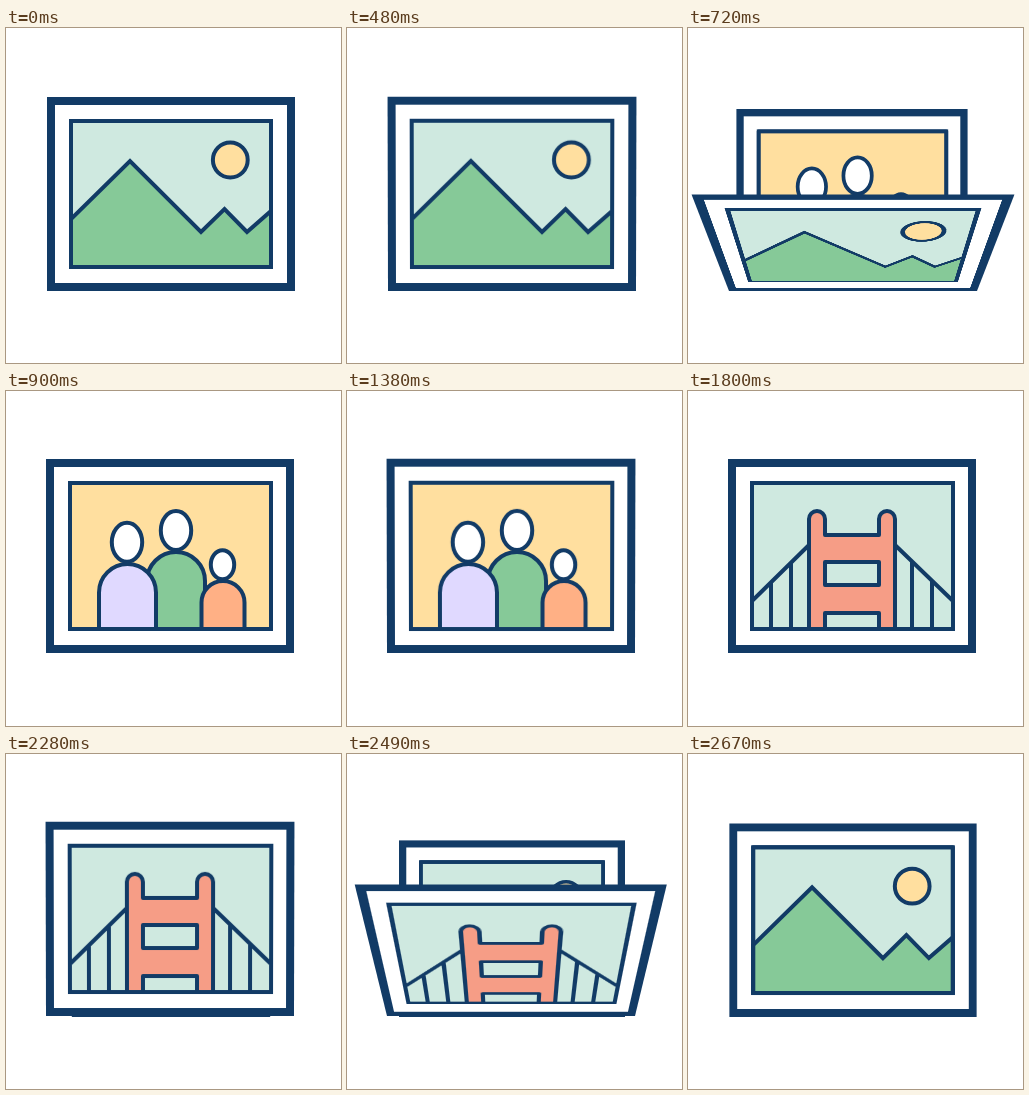
Animation of 335 by 335 pixels, one loop 2700 ms. Source, as an HTML page:

```html
<!DOCTYPE html>
<html lang="en">
<head>
<meta charset="utf-8">
<title>Falling picture frames</title>
<style>
  html, body { margin: 0; width: 100%; height: 100%; overflow: hidden; background: #fff; }
  #stage {
    position: relative; width: 335px; height: 335px; overflow: hidden;
    perspective: 725px; perspective-origin: 165px 166px;
  }
  .card {
    position: absolute; left: 40px; top: 68px; width: 248px; height: 194px;
    transform-origin: 50% 100%;
  }
  #hills { left: 41px; top: 69px; }
  .card * { stroke: #123b66; stroke-width: 4; stroke-linejoin: round; }
  .card .mat { fill: #fff; stroke-width: 8; stroke-linejoin: miter; }
  .card .edge { fill: none; stroke-linejoin: miter; }
  .sky { fill: #cfe9e0; }
  .sand { fill: #ffdf9f; }
  .green { fill: #86c998; }
  .lilac { fill: #e0d9ff; }
  .orange { fill: #ffb085; }
  .coral { fill: #f69d86; }
  .white { fill: #fff; }
  .line { fill: none; }
</style>
</head>
<body>
<div id="stage">
  <svg class="card" id="hills" viewBox="41 69 248 194">
    <rect class="mat" x="45" y="73" width="240" height="186"/>
    <rect class="sky" x="65" y="93" width="200" height="146"/>
    <path class="green" style="stroke-linejoin:miter" d="M65 239V191L124 133L195 204L218.500 181L241 204L265 183V239z"/>
    <circle class="sand" cx="224.300" cy="132" r="17.400"/>
    <rect class="edge" x="65" y="93" width="200" height="146"/>
  </svg>
  <svg class="card" id="family" viewBox="40 68 248 194">
    <rect class="mat" x="44" y="72" width="240" height="186"/>
    <rect class="sand" x="64" y="92" width="201" height="146"/>
    <ellipse class="white" cx="170" cy="139.500" rx="15.200" ry="19.500"/>
    <path class="green" d="M141 238V190a29 29 0 0 1 58 0V238z"/>
    <ellipse class="white" cx="121" cy="151.300" rx="15.200" ry="19.500"/>
    <path class="lilac" d="M93 238V201.500a28.500 28.500 0 0 1 57 0V238z"/>
    <ellipse class="white" cx="216.500" cy="173.800" rx="11.700" ry="14.500"/>
    <path class="orange" d="M195.500 238V211.500a21.500 21.500 0 0 1 43 0V238z"/>
    <rect class="edge" x="64" y="92" width="201" height="146"/>
  </svg>
  <svg class="card" id="bridge" viewBox="40 68 248 194">
    <rect class="mat" x="44" y="72" width="240" height="186"/>
    <rect class="sky" x="64" y="92" width="201" height="146"/>
    <path class="line" d="M64 210L121 154M207 154L265 210M83 191V238M103 172V238M224 171V238M244 190V238"/>
    <path class="coral" d="M121 238V128a8 8 0 0 1 16 0V144H191V128a8 8 0 0 1 16 0V238z"/>
    <path class="sky" d="M137 171H191V194H137zM137 222H191V238H137z"/>
    <rect class="edge" x="64" y="92" width="201" height="146"/>
  </svg>
</div>
<script>
const cards = [...document.querySelectorAll('.card')];
const TURN = 900, HOLD = 450, STEP = 30;
const EDGE_ON = 82.4; // angle at which the falling card is seen from its side

// cubic-bezier(.42, 0, .58, 1)
function easeInOut(x) {
  let lo = 0, hi = 1;
  for (let i = 0; i < 24; i++) {
    const u = (lo + hi) / 2, v = 1 - u;
    if (1.26 * v * v * u + 1.74 * v * u * u + u * u * u < x) lo = u; else hi = u;
  }
  return lo * lo * (3 - 2 * lo);
}

function draw(now) {
  const t = Math.floor(now / STEP) * STEP % (TURN * cards.length);
  const front = Math.floor(t / TURN);
  const p = Math.max(0, (t % TURN - HOLD) / (TURN - HOLD));
  const e = p ? easeInOut(p) : 0;
  const angle = 90 * e;
  cards.forEach((card, i) => {
    const depth = (i - front + cards.length) % cards.length;
    const shown = depth === 0 ? angle < EDGE_ON : depth === 1 && p > 0;
    card.style.visibility = shown ? 'visible' : 'hidden';
    card.style.zIndex = cards.length - depth;
    card.style.transform = depth ? `scale(${0.8 + 0.2 * e})` : e ? `rotateX(${-angle}deg)` : 'none';
  });
}

function loop() {
  draw(performance.now());
  requestAnimationFrame(loop);
}
loop();
</script>
</body>
</html>
```
